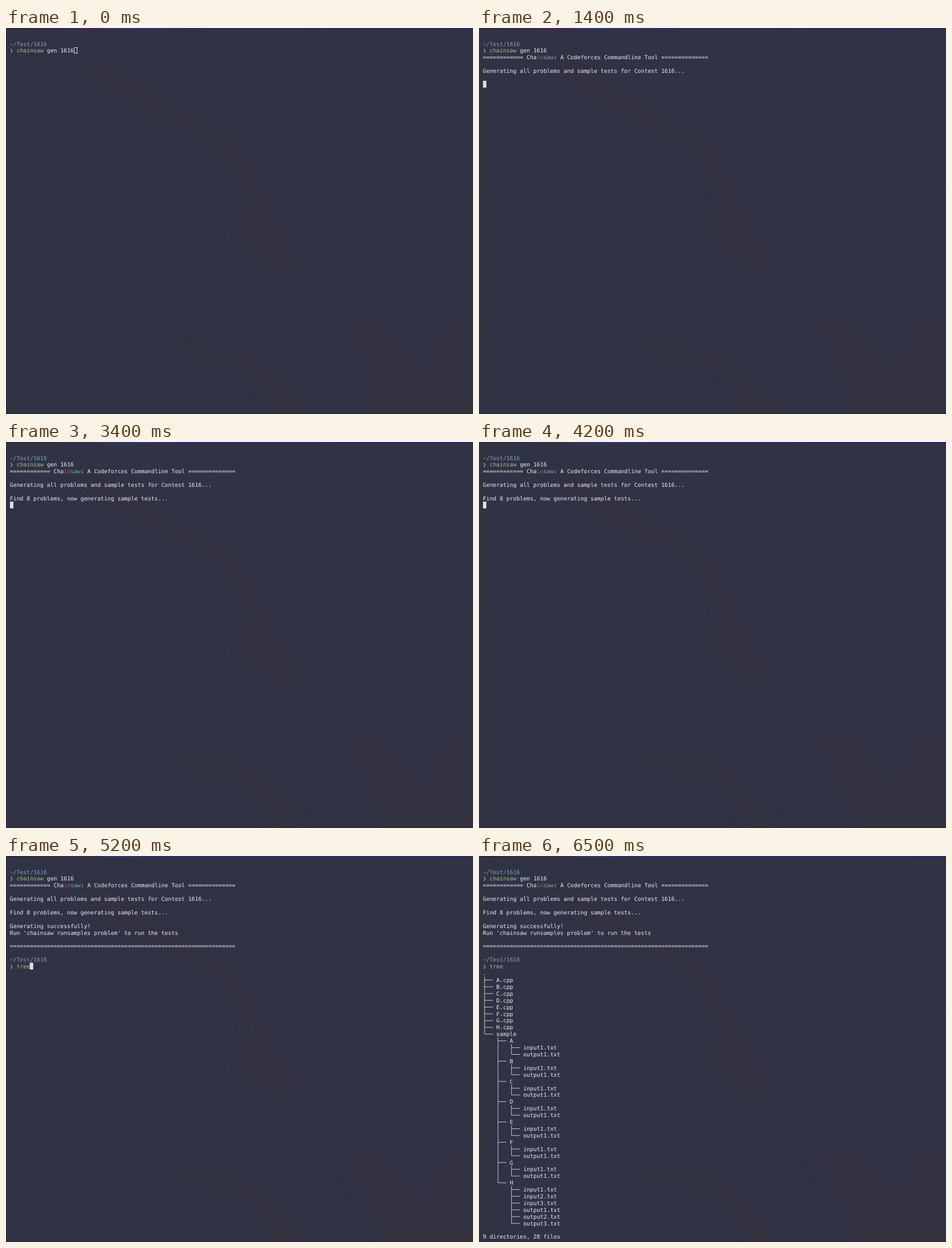
Recreate the animation shown at these times as an HTML page with a canvas. Size 824 by 680 pixels, loop 6.6 s.

```html
<!DOCTYPE html>
<html lang="en">
<head>
<meta charset="utf-8">
<title>Terminal session</title>
<style>
  html, body { margin: 0; width: 824px; height: 680px; overflow: hidden; background: #2f3344; }
  svg, canvas { position: absolute; left: 0; top: 0; }
</style>
</head>
<body>
<svg width="824" height="680">
  <defs>
    <filter id="soft"><feGaussianBlur stdDeviation="7"/></filter>
    <linearGradient id="edge">
      <stop offset="0" stop-color="#29204f"/>
      <stop offset=".13" stop-color="#45205c"/>
      <stop offset=".2" stop-color="#552163"/>
      <stop offset=".22" stop-color="#3434a0"/>
      <stop offset=".38" stop-color="#32279a"/>
      <stop offset="1" stop-color="#2b1a88"/>
    </linearGradient>
  </defs>
  <rect width="824" height="680" fill="#2f3344"/>
  <g filter="url(#soft)">
    <path fill="#303247" d="M390 180L480 205 550 208 650 232 760 292 840 292V700H670L520 420 440 270Z"/>
    <path fill="#323241" d="M110 50L190 60 290 130 400 195 440 265 520 410 490 438 408 380 420 300 370 210 250 155 170 110Z"/>
    <path fill="#323241" d="M600 510L650 515 735 605 785 512 840 540V700H665ZM285 552L430 566 525 660V700H480L420 600 290 575Z"/>
  </g>
  <rect width="824" height="1.5" fill="url(#edge)"/>
  <rect y="679" width="824" height="1" fill="#25263a"/>
  <rect width="1" height="680" fill="#292b3f"/>
</svg>
<canvas id="screen" width="824" height="680"></canvas>
<script>
const ctx = document.getElementById('screen').getContext('2d');
const LOOP = 6600, LEFT = 6.8, CELL = 5.945, LINE = 11.907;
const WHITE = '#e9edf4', BLUE = '#81a1c1', GREEN = '#a3be8c', PINK = '#c490b9', RED = '#bf515d';

const colX = col => LEFT + col * CELL;
const midY = row => 28 + row * LINE;

function text(row, col, str, color = WHITE) {
  ctx.fillStyle = color;
  ctx.fillText(str, colX(col), midY(row) + 3.5);
}

function cursor(row, col, hollow) {
  const x = Math.round(colX(col)), y = Math.round(midY(row) - 6.2);
  ctx.fillStyle = ctx.strokeStyle = '#d8dee9';
  if (hollow) ctx.strokeRect(x + .5, y + .5, 5, 10);
  else ctx.fillRect(x, y, 6, 12);
}

function prompt(row, command, args = '') {
  text(row, 0, '~/Test/1616', BLUE);
  text(row + 1, 0, '❯', PINK);
  text(row + 1, 2, command, GREEN);
  text(row + 1, 3 + command.length, args);
}

function stem(row, col, height = LINE) {
  ctx.fillStyle = '#c5cad5';
  ctx.fillRect(colX(col + .5) - .5, midY(row) - LINE / 2, 1, height);
}

function branch(row, col, name, last) {
  stem(row, col, last ? LINE / 2 : LINE);
  ctx.fillRect(colX(col + .5), midY(row) - .5, CELL * 2.5, 1);
  text(row, col + 4, name);
}

function tree(row) {
  const problems = [...'ABCDEFGH'];
  text(row++, 0, '.');
  for (const p of problems) branch(row++, 0, p + '.cpp');
  branch(row++, 0, 'sample', true);
  for (const p of problems) {
    const last = p === 'H', ids = last ? [1, 2, 3] : [1];
    const files = ['input', 'output'].flatMap(kind => ids.map(id => kind + id + '.txt'));
    branch(row++, 4, p, last);
    files.forEach((file, i) => {
      if (!last) stem(row, 4);
      branch(row++, 8, file, i === files.length - 1);
    });
  }
  text(row + 1, 0, '9 directories, 28 files');
}

function draw(t) {
  ctx.clearRect(0, 0, 824, 680);
  prompt(0, 'chainsaw', 'gen 1616');
  if (t < 500) return cursor(1, 19, t < 100);

  text(2, 0, '='.repeat(12) + ' Cha');
  text(2, 16, 'in', RED);
  text(2, 18, 'saw', BLUE);
  text(2, 21, ': A Codeforces Commandline Tool ' + '='.repeat(14));
  text(4, 0, 'Generating all problems and sample tests for Contest 1616...');
  if (t < 2200) return cursor(6, 0);

  text(6, 0, 'Find 8 problems, now generating sample tests...');
  if (t < 4400) return cursor(7, 0);

  text(8, 0, 'Generating successfully!');
  text(9, 0, "Run 'chainsaw runsamples problem' to run the tests");
  text(11, 0, '='.repeat(67));
  const typed = Math.max(0, Math.min(4, Math.floor((t - 4600) / 100)));
  prompt(13, 'tree'.slice(0, typed));
  if (t < 5300) return cursor(14, 2 + typed);

  tree(15);
}

ctx.font = '9.875px "DejaVu Sans Mono", monospace';
ctx.textRendering = 'geometricPrecision';
const start = performance.now();
function tick() {
  draw((performance.now() - start) % LOOP);
  requestAnimationFrame(tick);
}
tick();
</script>
</body>
</html>
```
